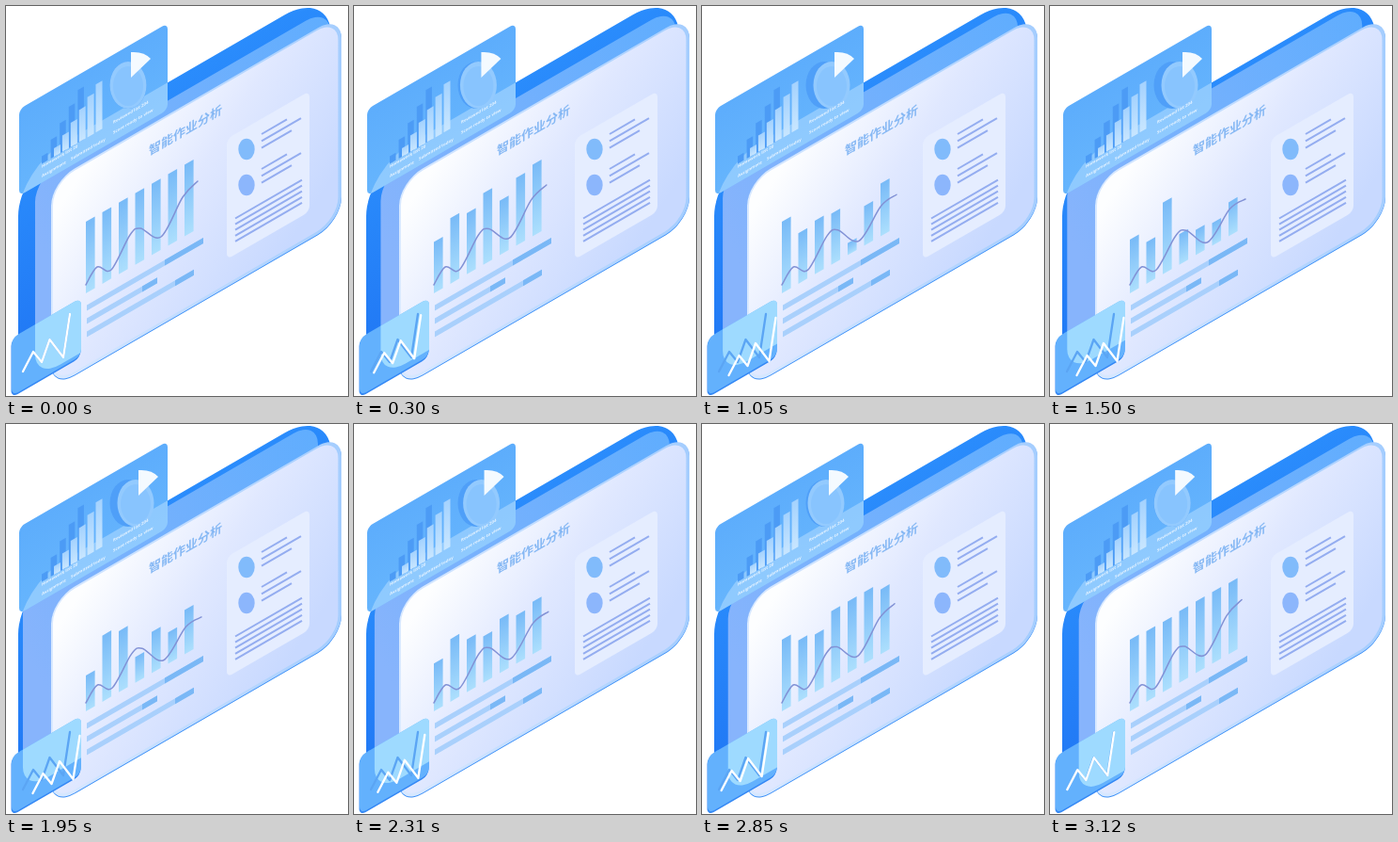
An HTML page that plays this animation: 364 px wide and 414 px high, repeating every 3150 ms.

```html
<!DOCTYPE html>
<html lang="zh">
<head>
<meta charset="utf-8">
<style>
html, body { margin: 0; width: 100%; height: 100%; overflow: hidden; background: #fff; }
svg { display: block; }
text { font-family: "Noto Sans CJK SC", "Noto Sans CJK", sans-serif; }
.tiny { font-family: "Open Sans", sans-serif; font-weight: 700; font-size: 4.4px; fill: #eaf5ff; }
</style>
</head>
<body>
<svg id="stage" width="364" height="414" viewBox="0 0 364 414">
  <defs>
    <linearGradient id="slab" x1="0" y1="0" x2="0" y2="1">
      <stop offset="0" stop-color="#2a8cfc"/><stop offset="1" stop-color="#1f74f3"/>
    </linearGradient>
    <linearGradient id="mid" x1="0" y1=".3" x2="1" y2="0">
      <stop offset="0" stop-color="#87b4fc"/><stop offset="1" stop-color="#5fadfe"/>
    </linearGradient>
    <linearGradient id="rim" x1="0" y1="0" x2="1" y2="0">
      <stop offset="0" stop-color="#d9e9ff"/><stop offset="1" stop-color="#a4cdfe"/>
    </linearGradient>
    <linearGradient id="panel" x1="0" y1="0" x2="1" y2=".75">
      <stop offset=".08" stop-color="#fdfeff"/><stop offset=".5" stop-color="#e0e8ff"/>
      <stop offset="1" stop-color="#c8d9ff"/>
    </linearGradient>
    <linearGradient id="bar" x1="0" y1="0" x2="0" y2="1">
      <stop offset="0" stop-color="#78baf7"/><stop offset="1" stop-color="#acdffd"/>
    </linearGradient>
    <linearGradient id="card" x1="0" y1="0" x2="0" y2="1">
      <stop offset="0" stop-color="#5dadfc"/><stop offset="1" stop-color="#66b5fd"/>
    </linearGradient>
    <linearGradient id="miniBar" x1="0" y1="0" x2="0" y2="1">
      <stop offset="0" stop-color="#a4d2fe"/><stop offset="1" stop-color="#c8e6ff"/>
    </linearGradient>
    <clipPath id="cardClip"></clipPath>
    <clipPath id="badgeClip"></clipPath>
  </defs>
</svg>
<script>
const LOOP = 3150, SLOPE = 0.577;
const $ = (id) => document.getElementById(id);
const stage = $('stage');

function add(tag, attrs, parent = stage) {
  const el = document.createElementNS('http://www.w3.org/2000/svg', tag);
  for (const k in attrs) el.setAttribute(k, attrs[k]);
  parent.appendChild(el);
  return el;
}
const iso = (x, y) => `matrix(1 ${-SLOPE} 0 1 ${x} ${y})`;
const tile = (x, y, width, height, rx, fill, parent) =>
  add('rect', { width, height, rx, fill, transform: iso(x, y) }, parent);
const oval = (cx, cy, rx, ry, fill, parent) => add('ellipse', { cx, cy, rx, ry, fill }, parent);
function label(x, y, str, attrs) {
  add('text', { transform: iso(x, y), ...attrs }).textContent = str;
}
const line = (x, y, len) => add('path', {
  d: `M${x} ${y}l${len} ${-SLOPE * len}`, stroke: '#94adf0', 'stroke-width': 2
});

const slabShape = (fill, parent) => tile(13, 173, 333, 240, 50, fill, parent);
const midShape = (fill, parent) => tile(31, 182, 314, 214, 26, fill, parent);
const cardShape = (fill, parent) => tile(14, 109.5, 158, 92, 6, fill, parent);
const badgeShape = (fill, parent) => tile(6, 352.5, 74, 61.5, 7, fill, parent);
cardShape('#000', $('cardClip'));
badgeShape('#000', $('badgeClip'));

// layers behind the panel
slabShape('url(#slab)');
const mid = add('g', {});
midShape('url(#mid)', mid);

// main panel
tile(48, 188, 309, 219, 25, '#3c90f8');
tile(48, 187, 309, 219, 25, 'url(#rim)');
tile(50, 188, 303.5, 213.5, 23, 'url(#panel)');
label(152, 159, '智能作业分析', { 'font-size': 13, 'font-weight': 700, fill: '#86b8f4' });

// profile card
tile(235, 141, 88, 128, 6, '#e5edff');
oval(256, 152, 8.7, 11.2, '#81bbfb');
oval(256, 190, 8.7, 11.2, '#8cb6fc');
for (const y of [136, 173]) [27, 42, 32].forEach((len, i) => line(272, y + i * 7.3, len));
for (let i = 0; i < 5; i++) line(244, 225.5 + i * 6.1, 71);

// bar chart: each bar makes one or two dips [start, lowest, end, depth]
const FULL = 76;
const dips = [
  [[0, 600, 1050, 43], [1050, 2000, 2850, 40]],
  [[0, 1500, 2050, 32], [2050, 2600, LOOP, 20]],
  [[0, 800, 1500, 30], [1500, 2600, LOOP, 27]],
  [[600, 1800, 2750, 58]],
  [[0, 1080, 2800, 65]],
  [[200, 1650, 2800, 58]],
  [[600, 1500, LOOP, 40]]
];
const bars = dips.map(() => tile(0, 0, 9.6, 1, 0, 'url(#bar)'));

const wave = [[85, 296], [97, 277], [112, 280], [132, 243], [143, 236], [165, 245], [188, 203], [204, 186]];
const curve = add('path', { fill: 'none', stroke: '#8292d6', 'stroke-width': 1.5, 'stroke-linecap': 'round' });

// progress rows: length and start of the dark end
[[124, 83], [75, 59], [114, 94]].forEach(([len, cut], i) => {
  const y = 317.5 + i * 14;
  tile(86, y, len, 6, 0, '#a9d0fc');
  tile(86 + cut, y - SLOPE * cut, len - cut, 6, 0, '#7ab8f6');
});

// statistics card, the slab shimmers through it
cardShape('url(#card)');
slabShape('rgba(200,232,255,.42)', add('g', { 'clip-path': 'url(#cardClip)' }));
function miniBars(count, x0, step, w, h0, grow, fill) {
  for (let i = 0; i < count; i++) {
    const x = x0 + i * step, h = h0 + i * grow;
    tile(x, 160 - SLOPE * (x - 51) - h, w, h, 0, fill);
  }
}
miniBars(5, 38, 9.6, 6.5, 8, 12, '#4c9bf5');
miniBars(6, 51, 8.9, 7, 9, 8.4, 'url(#miniBar)');

oval(130, 84, 19.5, 25, '#4f9ff8');
const pie = add('g', {});
oval(130, 84, 19.5, 25, '#93cafe', pie);
oval(130, 85, 16, 21, '#88c4fe', pie);
add('path', { d: 'M133 76v-27q14 -1 21 7z', fill: '#f4faff' }, pie);

[[38, 172, 'Homework list 20'], [38, 182, 'Assignment'], [69, 164, 'Submitted today'],
 [114, 125, 'Reviewed list 204'], [114, 136, 'Score ready to view']]
  .forEach(([x, y, str]) => label(x, y, str, { class: 'tiny' }));

// trend badge, the floating layer shimmers through it
tile(5.5, 354, 74, 62, 7, '#3488f5');
badgeShape('#63b1fd');
const glow = add('g', {}, add('g', { 'clip-path': 'url(#badgeClip)' }));
midShape('rgba(168,226,255,.85)', glow);
const trend = (stroke) => add('path', {
  d: 'M18 388L29 367L38 378L46.5 354L61 373L68 327', fill: 'none', stroke,
  'stroke-width': 2.3, 'stroke-linecap': 'round', 'stroke-linejoin': 'round'
});
trend('#5ba5f4');
const spark = trend('#fff');

// 0 to 1 between start and top, 1 until fall, back to 0 at end
const pulse = (t, start, top, fall, end) =>
  Math.max(0, Math.min(1, (t - start) / (top - start), (end - t) / (end - fall)));

function smooth(p) {
  let d = `M${p[0]}`;
  for (let i = 0; i < p.length - 1; i++) {
    const p0 = p[Math.max(i - 1, 0)], p1 = p[i], p2 = p[i + 1], p3 = p[Math.min(i + 2, p.length - 1)];
    const c1 = p1.map((v, k) => v + (p2[k] - p0[k]) / 6);
    const c2 = p2.map((v, k) => v - (p3[k] - p1[k]) / 6);
    d += `C${c1} ${c2} ${p2}`;
  }
  return d;
}
const move = (el, x, y) => el.setAttribute('transform', `translate(${x} ${y})`);

function draw(now) {
  const t = now % LOOP;
  const drift = 15 * pulse(t, 0, 1770, 1770, LOOP);
  const bend = pulse(t, 0, 1400, 1950, LOOP);
  const lift = pulse(t, 0, 1000, 1950, LOOP);

  for (const el of [mid, glow]) move(el, -drift, -drift * 0.45);
  move(spark, lift * 10.5, lift * 4);
  move(pie, lift * 8, 0);

  bars.forEach((bar, i) => {
    const h = dips[i].reduce((sum, [start, low, end, depth]) =>
      sum - depth * pulse(t, start, low, low, end), FULL);
    bar.setAttribute('height', h);
    bar.setAttribute('transform', iso(85 + i * 17.5, 305 - SLOPE * i * 17.5 - h));
  });

  curve.setAttribute('d', smooth(wave.map(([x, y]) => {
    const s = (x - 85) / 119;
    return [x + 4 * s * bend, y + 19 * s ** 3 * bend];
  })));
}

const start = performance.now();
function tick() {
  draw(performance.now() - start);
  requestAnimationFrame(tick);
}
tick();
</script>
</body>
</html>
```
